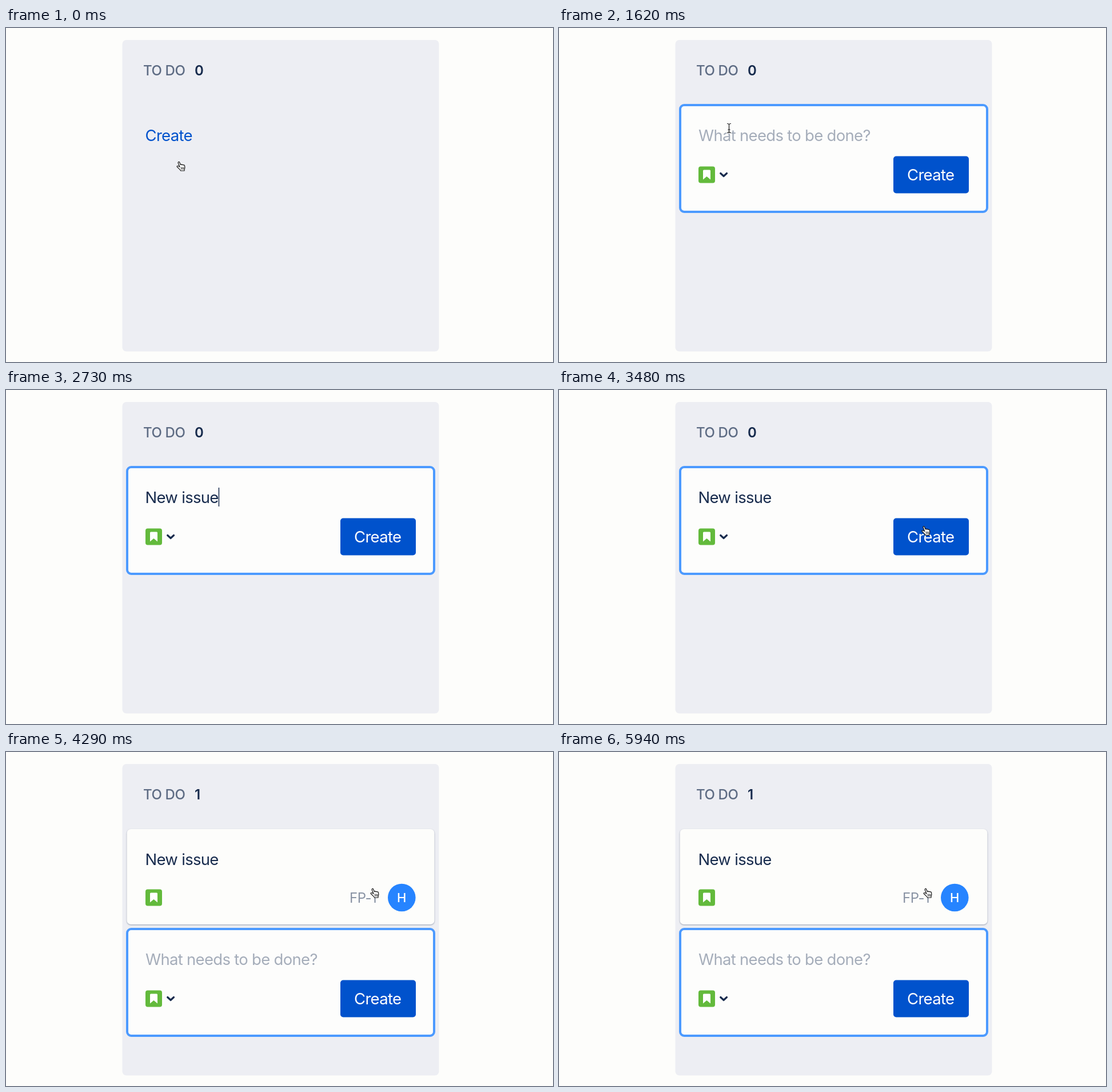
Recreate the animation shown at these times as an HTML page. Size 957 px wide and 585 px high, loop 5970 ms.

```html
<!DOCTYPE html>
<html lang="en">
<head>
<meta charset="utf-8">
<title>Create an issue</title>
<style>
  html, body { margin: 0; width: 100%; height: 100%; overflow: hidden; background: #fdfdfb; }
  svg { display: block; width: 957px; height: 585px; }
  text { font: 400 27.5px Inter, "Liberation Sans", sans-serif; letter-spacing: -.7px; fill: #172b4d; white-space: pre; }
  .link { fill: #0052cc; }
  .hint { fill: #a5adba; }
  .light { fill: #fff; }
  .head { font-size: 24px; font-weight: 500; letter-spacing: -.4px; fill: #5e6c84; }
  .count { font-size: 24px; font-weight: 600; }
  .key { font-size: 24px; letter-spacing: -.5px; fill: #8993a4; }
  .initial { font-size: 22px; font-weight: 500; letter-spacing: 0; text-anchor: middle; fill: #fff; }
  #card > rect { filter: drop-shadow(0 1px 1.2px rgba(9, 30, 66, .38)); }
</style>
</head>
<body>
<svg viewBox="0 0 957 585">
  <defs>
    <g id="story">
      <rect width="29" height="29" rx="4" fill="#63ba3c"/>
      <path d="M9.5 6h10a1.5 1.5 0 0 1 1.5 1.5V23l-6.5-5.5L8 23V7.5A1.5 1.5 0 0 1 9.5 6z" fill="#fff"/>
    </g>
  </defs>

  <rect x="203.5" y="21" width="554" height="545.5" rx="7" fill="#edeef3"/>
  <text class="head" x="240" y="83">TO DO</text>
  <text class="count" id="count" x="330" y="83">0</text>
  <text class="link" id="link" x="243.5" y="198">Create</text>

  <g id="card">
    <rect x="211.5" y="135" width="538" height="167" rx="7" fill="#fdfdfb"/>
    <text x="243.5" y="198">New issue</text>
    <use href="#story" x="244" y="240.5"/>
    <text class="key" x="601" y="264">FP-1</text>
    <circle cx="692.3" cy="255" r="24.3" fill="#2684ff"/>
    <text class="initial" x="692.3" y="263">H</text>
  </g>

  <g id="composer">
    <rect x="212" y="135" width="537" height="187" rx="7" fill="#fdfdfc" stroke="#4c9aff" stroke-width="4"/>
    <text class="hint" id="hint" x="244" y="198">What needs to be done?</text>
    <text id="entry" x="243.5" y="198"></text>
    <rect id="caret" y="171" width="1.5" height="33" fill="#172b4d"/>
    <use href="#story" x="244" y="242.5"/>
    <path d="M282.7 254.5l5.4 5 5.4-5" fill="none" stroke="#172b4d" stroke-width="3.2" stroke-linecap="round" stroke-linejoin="round"/>
    <rect x="585" y="224.5" width="132" height="65" rx="5" fill="#0052cc"/>
    <text class="light" x="609" y="267">Create</text>
  </g>

  <g id="hand" stroke="#111" stroke-width="1.2" stroke-linejoin="round" stroke-linecap="round">
    <path fill="#fff" d="M6 10.2L3.2 3.4C2.6 1.4 4.9.6 5.6 2.3L7.4 6.6C8 5.6 9.6 5.8 9.9 6.8 10.6 6 12 6.2 12.2 7.2 13.2 6.6 14.4 7.2 14.6 8.4 15 10.5 15.2 12 14.2 14.2L14 17H7.6C7 15.5 5 13.8 3.4 12.2 2 11 .6 10 1.2 9 2 8 4 8.8 6 10.2z"/>
    <path fill="none" stroke-width=".9" d="M8.4 11l.3 3.4M10.5 11l.2 3.4M12.5 11l.1 3.4"/>
  </g>
  <g id="beam" fill="none" stroke-linecap="round">
    <path id="beamLine" d="M-3-8q2.5 0 3 1.5Q.5-8 3-8M0-6.5V6.5M-3 8q2.5 0 3-1.5Q.5 8 3 8M-1.7 2.5h3.4" stroke="#fff" stroke-width="2.6"/>
    <use href="#beamLine"/>
    <path d="M-3-8q2.5 0 3 1.5Q.5-8 3-8M0-6.5V6.5M-3 8q2.5 0 3-1.5Q.5 8 3 8M-1.7 2.5h3.4" stroke="#111" stroke-width="1.2"/>
  </g>
</svg>

<script>
const LOOP = 5970, BLINK = 567;
const OPEN = 1050, SUBMIT = 3690, POP = 300;
const WORDS = 'New issue';
const KEYS = [1770, 1890, 1980, 2100, 2190, 2280, 2370, 2490, 2580];
const HIDDEN = [KEYS[0], 2940];

// pointer stops: time, x, y of the hand's top left corner
const STOPS = [
  [0, 298, 233], [270, 298, 233], [870, 292.5, 175],
  [3000, 292.5, 175], [3510, 637, 238], [LOOP, 637, 238]
];

const $ = id => document.getElementById(id);
const [count, link, card, composer, hint, entry, caret, hand, beam] =
  ['count', 'link', 'card', 'composer', 'hint', 'entry', 'caret', 'hand', 'beam'].map($);

const show = (el, on) => el.setAttribute('visibility', on ? 'visible' : 'hidden');
const move = (el, x, y) => el.setAttribute('transform', `translate(${x} ${y})`);
const ease = p => p * p * (3 - 2 * p);

function pointerAt(t) {
  const i = STOPS.findIndex((s, n) => n > 0 && t <= s[0]);
  const [t0, x0, y0] = STOPS[i - 1], [t1, x1, y1] = STOPS[i];
  const p = ease((t - t0) / (t1 - t0));
  return [x0 + (x1 - x0) * p, y0 + (y1 - y0) * p];
}

function draw(t) {
  const open = t >= OPEN, done = t >= SUBMIT;
  const typed = done ? 0 : KEYS.filter(k => k <= t).length;

  count.textContent = done ? '1' : '0';
  show(link, !open);
  show(composer, open);
  show(card, done);
  move(composer, 0, done ? 175 : 0);

  entry.textContent = WORDS.slice(0, typed);
  show(hint, open && !typed);
  const wake = done ? SUBMIT : typed ? KEYS[typed - 1] : OPEN;
  caret.setAttribute('x', 244 + (typed ? entry.getComputedTextLength() - .5 : 0));
  show(caret, open && Math.floor((t - wake) / BLINK) % 2 === 0);

  const left = 1 - Math.min(1, Math.max(0, (t - SUBMIT) / POP));
  const scale = 1 - .032 * left ** 3;
  card.setAttribute('transform', `translate(480.5 218.5) scale(${scale}) translate(-480.5 -218.5)`);

  const [x, y] = pointerAt(t);
  const away = t >= HIDDEN[0] && t < HIDDEN[1];
  const overText = open && !done && y < 204;
  move(hand, x, y);
  move(beam, x + 5, y + .5);
  show(hand, !away && !overText);
  show(beam, !away && overText);
}

const start = performance.now();
function tick() {
  draw((performance.now() - start) % LOOP);
  requestAnimationFrame(tick);
}
tick();
</script>
</body>
</html>
```
